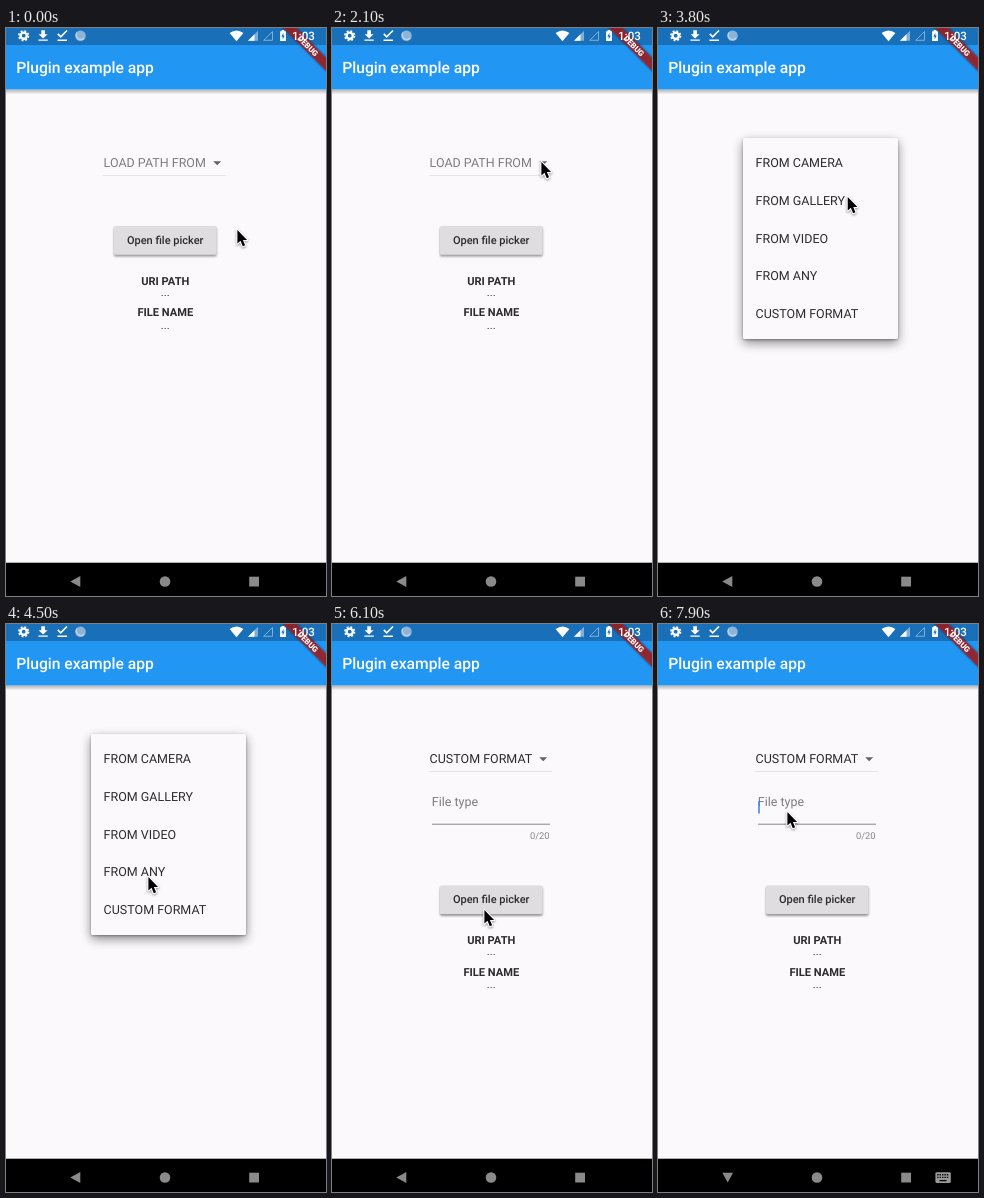
These frames come from a looping animation (320 px wide and 568 px high, 8 s). An HTML page:

```html
<!DOCTYPE html>
<html lang="en">
<head>
<meta charset="utf-8">
<title>Plugin example app</title>
<style>
  html, body { margin: 0; width: 100%; height: 100%; overflow: hidden; background: #fbf9fc; }
  svg { display: block; width: 100vw; height: 100vh; }
  text { font-family: Roboto, sans-serif; font-size: 12.5px; fill: #2b2a2d; text-rendering: geometricPrecision; }
  .mid { text-anchor: middle; font-size: 11px; }
  .bold { font-weight: 700; font-size: 11.1px; }
  .medium { font-weight: 500; }
  .hint { fill: #7d7c80; }
  .line { fill: none; stroke: #fff; stroke-width: 1.6; }
  #cursor { filter: drop-shadow(0 1px 1px #0006); }
</style>
</head>
<body>
<svg viewBox="0 0 320 568">
  <defs>
    <filter id="soft" x="-30%" y="-30%" width="160%" height="170%"><feGaussianBlur stdDeviation="1.3"/></filter>
    <filter id="deep" x="-20%" y="-20%" width="140%" height="150%"><feGaussianBlur stdDeviation="5.5"/></filter>
    <linearGradient id="fall" x2="0" y2="1">
      <stop stop-color="#000" stop-opacity=".3"/>
      <stop offset="1" stop-color="#000" stop-opacity="0"/>
    </linearGradient>
  </defs>
  <rect width="320" height="568" fill="#fbf9fc"/>

  <!-- page content -->
  <path d="M97 147.5H220" stroke="#e3e1e5" stroke-width=".9"/>
  <text id="choice" x="97.6" y="139.4"></text>
  <path d="M207.2 133.2h8l-4 4z" fill="#636266"/>
  <g id="field">
    <text class="hint" x="99.8" y="181.5">File type</text>
    <path d="M100 200.2H218" stroke="#7b7a7d" stroke-width=".9"/>
    <text x="217.6" y="215.4" text-anchor="end" style="font-size:9.35px;fill:#858488">0/20</text>
    <path id="caret" d="M101 177v12.5" stroke="#4285f4" stroke-width="1.6"/>
  </g>
  <g id="lower">
    <rect x="108" y="199.5" width="102.5" height="29" rx="1.6" opacity=".4" filter="url(#soft)"/>
    <rect x="108" y="198" width="102.5" height="28.7" rx="1.6" fill="#dfdde0"/>
    <text class="mid medium" x="159.2" y="215.8">Open file picker</text>
    <text class="mid bold" x="159.3" y="256.8">URI PATH</text>
    <text class="mid" x="159.2" y="268">...</text>
    <text class="mid bold" x="159.3" y="288.3">FILE NAME</text>
    <text class="mid" x="159.2" y="300.5">...</text>
  </g>

  <!-- app bar and status bar -->
  <rect y="61.4" width="320" height="5" fill="url(#fall)"/>
  <rect width="320" height="61.4" fill="#2196f3"/>
  <rect width="320" height="17" fill="#1a70b8"/>
  <text class="medium" x="10.2" y="45.2" style="font-size:15.65px;fill:#fff">Plugin example app</text>
  <g id="menu">
    <rect class="panel" x="85" y="114" width="155" rx="2" opacity=".45" filter="url(#deep)"/>
    <rect class="panel" x="85" y="111" width="155" rx="2" opacity=".3" filter="url(#soft)"/>
    <rect class="panel" x="85" y="110" width="155" rx="1.6" fill="#fbf9fc"/>
  </g>
  <g transform="translate(320) rotate(45)">
    <rect x="-40" y="20.8" width="80" height="9.4" opacity=".5" filter="url(#soft)"/>
    <rect x="-40" y="20.8" width="80" height="9.4" fill="#b71c1c" fill-opacity=".75"/>
    <text x="0" y="28.3" text-anchor="middle" style="font-size:7.9px;font-weight:900;fill:#fff">DEBUG</text>
  </g>
  <g transform="translate(0 -.3)">
    <circle class="line" cx="17.7" cy="8" r="3.1" style="stroke-width:2.4"/>
    <circle class="line" cx="17.7" cy="8" r="4.8" stroke-dasharray="2 1.77"/>
    <path d="M35.3 2.5h3.6v4h2.7l-4.5 4.4-4.5-4.4h2.7z M32.4 11.7h9.4v1.4h-9.4z" fill="#fff"/>
    <path class="line" d="M51.8 6.2l2.9 2.9 6.3-6.3M51.5 12.6h9.5"/>
    <circle cx="74.5" cy="8" r="5.3" fill="#8db4d8"/>
    <path d="M71 5a4.4 4.4 0 0 0 7 5.3" fill="none" stroke="#bdd3e8" stroke-width="1.4"/>
    <path d="M223.6 5.2q6.9-5 13.8 0L230.5 13.5z" fill="#fff"/>
    <path d="M252 3v10h-10z" fill="#7fafd8"/>
    <path d="M248.5 6.5V13h-6.5z" fill="#fff"/>
    <path d="M266.5 3.8v8.8h-8.8z" fill="none" stroke="#7fafd8"/>
    <path d="M275.6 2.4h2.8v1.1h1.5v9.9h-5.8V3.5h1.5z" fill="#fff"/>
    <path d="M277.4 5l-2 4h1.3v2.8l2-4h-1.3z" fill="#1a70b8"/>
    <text class="medium" x="286" y="12.3" style="font-size:11.6px;fill:#fff">1:03</text>
  </g>

  <!-- navigation bar -->
  <rect y="534.7" width="320" height="33.3"/>
  <g fill="#8a8a8a">
    <path id="back"/>
    <circle cx="159" cy="553.5" r="5.3"/>
    <rect x="243.2" y="548.7" width="9.8" height="9.8"/>
    <g id="keyboard">
      <rect x="277.4" y="548.3" width="15.4" height="10.6" rx="1.3" fill="#999"/>
      <path d="M279.2 550.8h12M279.2 553.4h12" stroke="#000" stroke-width="1.4" stroke-dasharray="1.4 1"/>
      <path d="M281.5 556.6h7" stroke="#000" stroke-width="1.3"/>
    </g>
  </g>

  <path id="cursor" d="M.4 1V14.6L3.5 11.8 5.8 17.2 8.1 16.2 5.9 10.9H10.1Z"
        stroke="#fff" stroke-width="2.2" stroke-linejoin="round" paint-order="stroke"/>
</svg>
<script>
const LOOP = 8000, STEP = 100;
const OPEN = 2300, PICK = 6000, FOCUS = 7900;
const $ = id => document.getElementById(id);
const clamp = v => Math.min(1, Math.max(0, v));
const show = (id, on) => $(id).style.display = on ? '' : 'none';

// time, x, y of the pointer tip
const route = [
  [0, 231, 201], [500, 213, 130], [1800, 213, 130], [2100, 209, 133], [3600, 209, 133],
  [4200, 150, 238], [4300, 150, 238], [4500, 142, 252], [4800, 152, 316], [5200, 168, 273],
  [5300, 164, 267], [5700, 152, 285], [6400, 152, 285], [6700, 144, 213], [7300, 129, 187], [LOOP, 129, 187]
];

const items = ['CAMERA', 'GALLERY', 'VIDEO', 'ANY'].map(s => 'FROM ' + s).concat('CUSTOM FORMAT').map((label, i) => {
  const el = document.createElementNS('http://www.w3.org/2000/svg', 'text');
  el.textContent = label;
  el.setAttribute('x', 97.6);
  el.setAttribute('y', 139.4 + i * 37.65);
  $('menu').append(el);
  return el;
});
const panels = document.querySelectorAll('.panel');

function pointer(t) {
  const i = route.findIndex(key => key[0] > t);
  const [t0, x0, y0] = route[i - 1], [t1, x1, y1] = route[i];
  const k = (t - t0) / (t1 - t0);
  return [x0 + (x1 - x0) * k, y0 + (y1 - y0) * k];
}

function draw(t) {
  const picked = t >= PICK, focused = t >= FOCUS;
  $('choice').textContent = picked ? 'CUSTOM FORMAT' : 'LOAD PATH FROM';
  $('choice').setAttribute('class', picked ? '' : 'hint');
  show('field', picked);
  $('lower').setAttribute('transform', `translate(0 ${picked ? 63.4 : 0})`);

  const grow = clamp((t - OPEN) / 200);
  show('menu', grow > 0 && t < PICK + STEP);
  $('menu').style.opacity = picked ? 0.5 : 1;
  panels.forEach(p => p.setAttribute('height', 37 + 164 * grow));
  items.forEach((el, i) => el.style.opacity = clamp(6 * grow - 1 - i));

  show('caret', focused);
  show('keyboard', focused);
  $('back').setAttribute('d', focused ? 'M64.3 548.8h10.8l-5.4 9.8z' : 'M74.3 548v11l-10-5.5z');
  $('cursor').setAttribute('transform', `translate(${pointer(t)})`);
}

const start = performance.now();
function tick() {
  const t = (performance.now() - start) % LOOP;
  draw(Math.floor(t / STEP) * STEP);
  requestAnimationFrame(tick);
}
tick();
</script>
</body>
</html>
```
